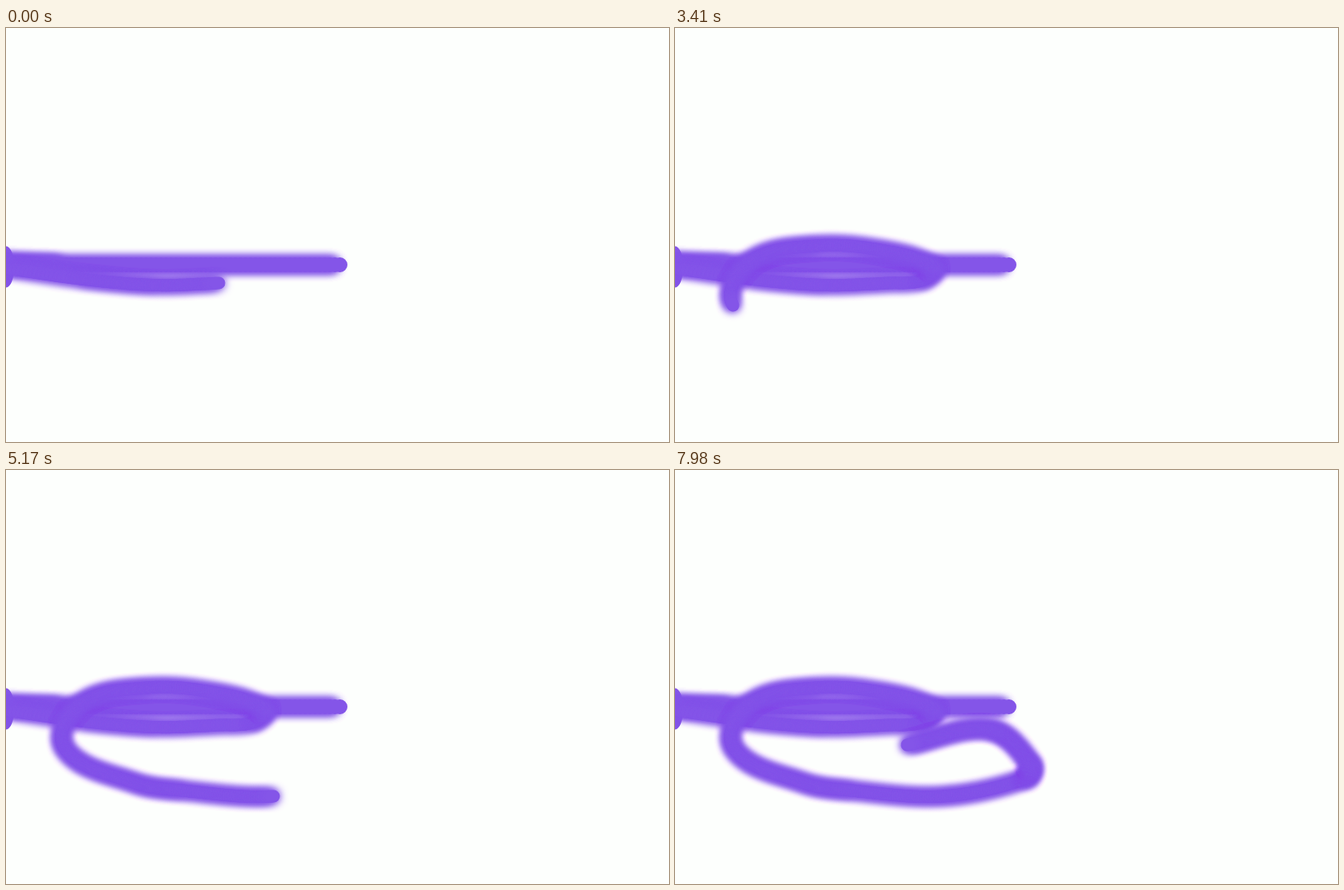
Recreate the animation shown at these times as an HTML page with a canvas. Size 800 by 500 pixels, loop 8 s.

```html
<!DOCTYPE html>
<html lang="en">
<head>
<meta charset="utf-8">
<title>Glowing brush</title>
<style>
  html, body { margin: 0; width: 100%; height: 100%; overflow: hidden; background: #fdfffd; }
  canvas { display: block; }
</style>
</head>
<body>
<canvas id="stage" width="800" height="500"></canvas>
<script>
const ctx = document.getElementById('stage').getContext('2d');
const LOOP = 8000, TICK = 147.8, LEAD = 10; // ms
const INK = '#8455e8', PAPER = '#fdfffd';
const SAMPLES = 9; // brush segments per tick: slow movement builds up more glow

// Key positions of the brush: x, y, tick of departure towards it, tick of arrival
const keys = [
  [0, 290, -7, -7], [90, 303, -7, -5], [180, 310.5, -5, -2], [257, 308, -2, 0],
  [297, 305, 0, 1], [312, 289, 3, 5],
  [247, 268, 7, 10], [170, 263, 10, 13], [92, 281, 15, 19],
  [70, 335, 20, 23], [156, 378, 23, 28], [212, 387, 28, 31], [323, 394, 31, 35],
  [422, 373, 35, 39], [429.5, 356, 40, 43], [380, 313.5, 43, 48], [280, 332, 48, 54]
];

// Unit direction of the path at key i
function heading(i) {
  const a = keys[Math.max(0, i - 1)], b = keys[Math.min(keys.length - 1, i + 1)];
  const dx = b[0] - a[0], dy = b[1] - a[1], len = Math.hypot(dx, dy);
  return [dx / len, dy / len];
}

// Hermite position between keys i - 1 and i
function position(i, u) {
  const a = keys[i - 1], b = keys[i], m = heading(i - 1), n = heading(i);
  const chord = Math.hypot(b[0] - a[0], b[1] - a[1]);
  const w = u * u * (3 - 2 * u), p = u * (1 - u) * (1 - u), q = u * u * (u - 1);
  return [0, 1].map(k => a[k] + (b[k] - a[k]) * w + chord * (m[k] * p + n[k] * q));
}

const strokes = [];
let last = keys[0].slice(0, 2);
keys.slice(1).forEach(([, , from, to], i) => {
  const n = (to - from) * SAMPLES;
  for (let s = 1; s <= n; s++) {
    const next = position(i + 1, s / n);
    strokes.push({ tick: from + s / SAMPLES, from: last, to: next });
    last = next;
  }
});

function segment(from, to, width) {
  ctx.lineWidth = width;
  ctx.beginPath();
  ctx.moveTo(...from);
  ctx.lineTo(...to);
  ctx.stroke();
}

function glow(blur) {
  ctx.shadowColor = blur ? INK : 'transparent';
  ctx.shadowBlur = blur;
}

function drawBase() {
  glow(0);
  ctx.fillStyle = PAPER;
  ctx.fillRect(0, 0, 800, 500);
  ctx.fillStyle = ctx.strokeStyle = INK;
  ctx.lineCap = 'round';
  glow(11);
  for (let i = 0; i < 4; i++) {
    segment([-20, 286], [393, 286], 16);
    segment([-20, 282], [60, 286], 16);
  }
  glow(0);
  ctx.beginPath();
  for (let x = 1; x <= 403; x += 6) {
    ctx.moveTo(x, 286);
    ctx.arc(x, 286, 9, 0, 7);
  }
  ctx.moveTo(0, 288.5);
  ctx.ellipse(0, 288.5, 10, 25, 0, 0, 7);
  ctx.fill();
}

let shown = Infinity;
function drawTo(tick) {
  if (tick < shown) {
    drawBase();
    shown = -Infinity;
  }
  glow(11);
  for (const s of strokes) {
    if (s.tick > shown && s.tick <= tick) segment(s.from, s.to, 15);
  }
  shown = tick;
}

const begin = performance.now();
function frame() {
  const t = (performance.now() - begin) % LOOP;
  const tick = Math.floor((t + LEAD) / TICK);
  if (tick !== shown) drawTo(tick);
  requestAnimationFrame(frame);
}
frame();
</script>
</body>
</html>
```
